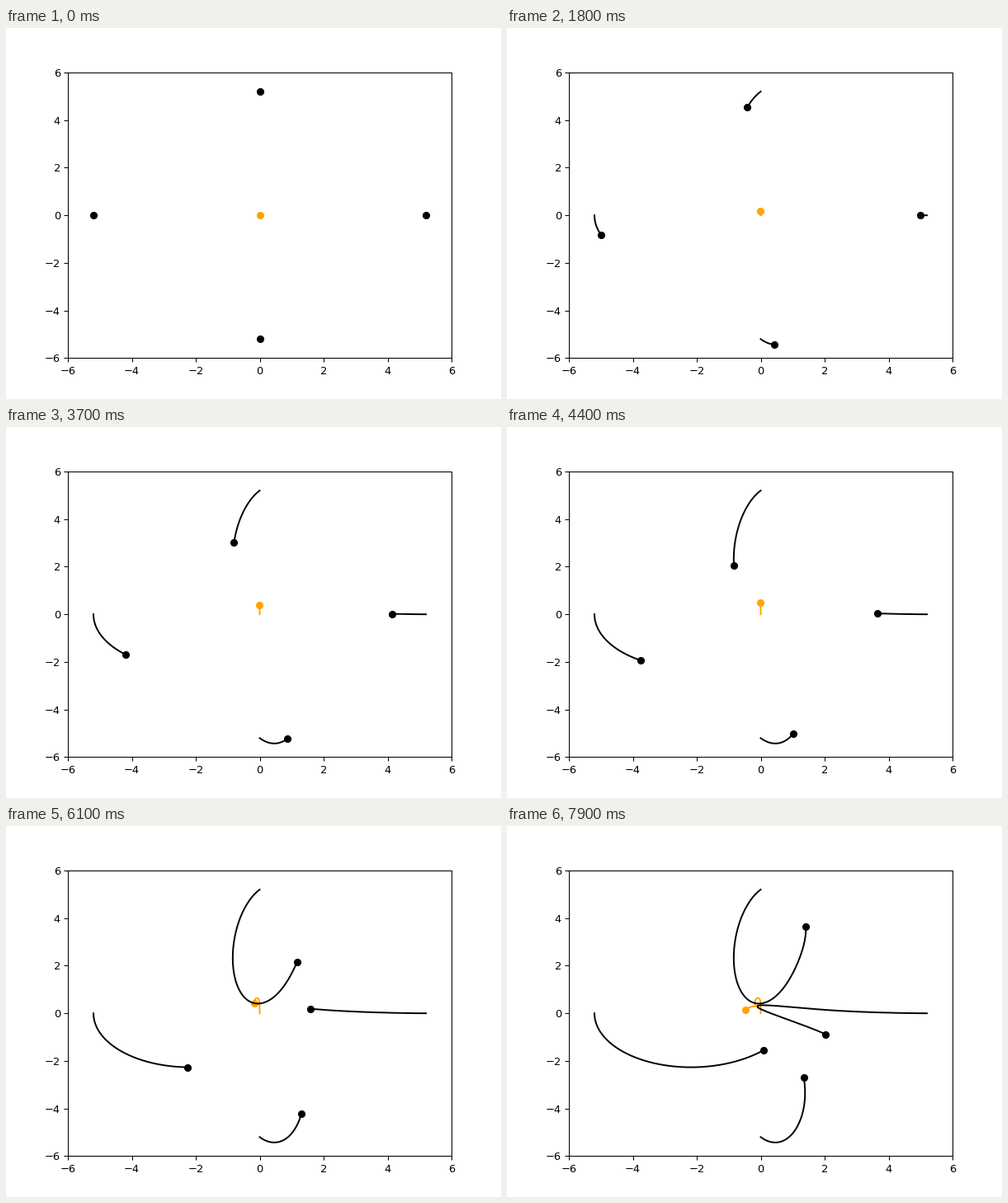
Animation of 600x450 px, one loop 8000 ms. Source, as a matplotlib script:

```python
import numpy as np
import matplotlib.pyplot as plt
from matplotlib.animation import FuncAnimation

FRAMES, INTERVAL = 80, 100
SUB = 20      # trail samples per frame
START = 0.18  # seconds before the bodies are released
G = 0.389     # gravity in units of planet mass and seconds
R = 5.2

# One star and four planets; total momentum is zero.
mass = np.array([10, 1, 1, 1, 1.0])
v = 0.3 * np.sqrt(G * mass[0] / R)
pos = R * np.array([[0, 0], [1, 0], [0, 1], [-1, 0], [0, -1]])
vel = v * np.array([[0, 0.4], [0, 0], [-1, -1], [0, -2], [1, -1]])


def gaps(p):
    """Separation vectors and distances between all pairs."""
    d = p[None] - p[:, None]
    r = np.sqrt((d ** 2).sum(axis=2))
    np.fill_diagonal(r, np.inf)
    return d, r


def rate(s):
    d, r = gaps(s[0])
    acc = G * (d * (mass / r ** 3)[:, :, None]).sum(axis=1)
    return np.array([s[1], acc])


def rk4(s, h):
    a = rate(s)
    b = rate(s + h / 2 * a)
    c = rate(s + h / 2 * b)
    d = rate(s + h * c)
    return s + h / 6 * (a + 2 * b + 2 * c + d)


def advance(s, span):
    """Integrate over span with shorter steps during close passes."""
    while span > 1e-12:
        h = min(span, max(0.02 * gaps(s[0])[1].min() ** 1.5, 1e-6))
        s = rk4(s, h)
        span -= h
    return s


state = np.array([pos, vel])
tick = INTERVAL / 1000 / SUB
track = [pos]
for i in range(1, (FRAMES - 1) * SUB + 1):
    state = advance(state, np.clip(i * tick - START, 0, tick))
    track.append(state[0])
track = np.array(track)

fig, ax = plt.subplots(figsize=(6.4, 4.8), dpi=93.75)
fig.subplots_adjust(bottom=0.1102)
ax.set(xlim=(-6, 6), ylim=(-6, 6),
       xticks=range(-6, 7, 2), yticks=range(-6, 7, 2))

colors = ["orange"] + ["black"] * 4
trails = [ax.plot([], [], color=c, lw=1.5)[0] for c in colors]
dots = [ax.plot([], [], "o", color=c, ms=6)[0] for c in colors]
for z, line in enumerate(dots[:1] + trails + dots[1:]):
    line.set_zorder(2 + z / 100)


def draw(frame):
    n = frame * SUB
    for k, (trail, dot) in enumerate(zip(trails, dots)):
        trail.set_data(track[:n + 1, k, 0], track[:n + 1, k, 1])
        dot.set_data(track[n:n + 1, k, 0], track[n:n + 1, k, 1])
    return trails + dots


anim = FuncAnimation(fig, draw, frames=FRAMES, interval=INTERVAL,
                     repeat=True, repeat_delay=0)
plt.show()
```
